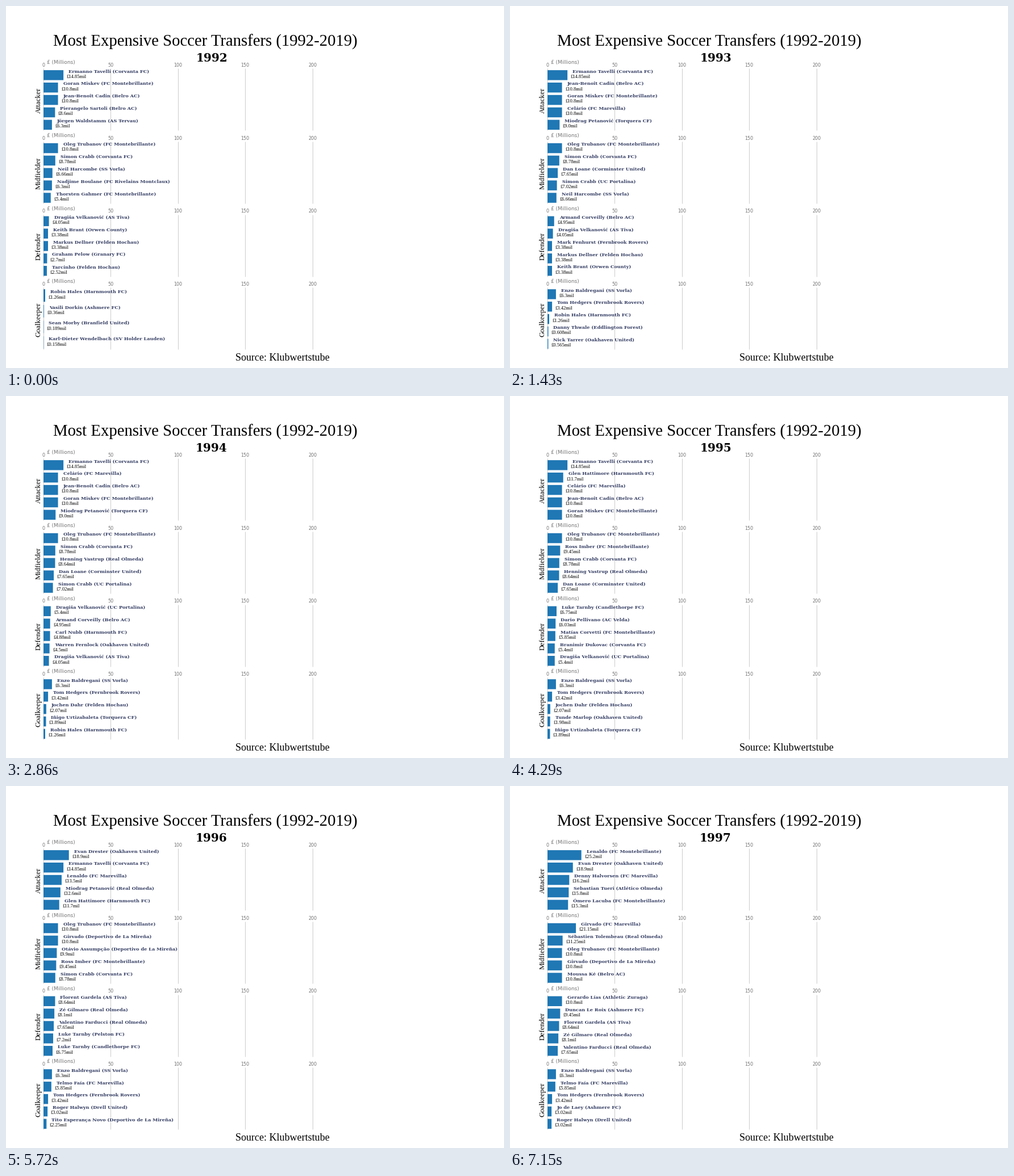
These frames come from a looping animation (877x638 px, 8 s). A matplotlib script:

```python
import matplotlib.pyplot as plt
from matplotlib.animation import FuncAnimation
from matplotlib.patches import Rectangle

W, H, DPI = 877, 638, 64
LOOP, STEP, HOLD = 8000, 40, 1430
START = 1992
X0, PER_MIL = 66, 2.3675
TOP, PITCH, TALL = 110.2, 128.7, 109
BAR, GREY, NAVY = "#1f77b4", "#777777", "#343d63"
SERIF, BOOK, SANS = "Liberation Serif", "DejaVu Serif", "DejaVu Sans"

# Each deal: player, club, fee in millions, year
DEALS = {
    "Attacker": [
        ("Ermanno Tavelli", "Corvanta FC", 14.85, 1992),
        ("Celário", "FC Marevilla", 10.8, 1993),
        ("Jean-Benoît Cadin", "Belro AC", 10.8, 1992),
        ("Goran Miskev", "FC Montebrillante", 10.8, 1992),
        ("Pierangelo Sartoli", "Belro AC", 8.6, 1992),
        ("Jörgen Waldstamm", "AS Tervau", 6.3, 1992),
        ("Miodrag Petanović", "Torquera CF", 9.0, 1993),
        ("Glen Hattimore", "Harnmouth FC", 11.7, 1995),
        ("Evan Drester", "Oakhaven United", 18.9, 1996),
        ("Lenaldo", "FC Marevilla", 13.5, 1996),
        ("Miodrag Petanović", "Real Olmeda", 12.6, 1996),
        ("Lenaldo", "FC Montebrillante", 25.2, 1997),
        ("Denny Halvorsen", "FC Marevilla", 16.2, 1997),
        ("Sebastian Tueri", "Atlético Olmeda", 15.8, 1997),
        ("Ómero Lacuba", "FC Montebrillante", 15.3, 1997),
    ],
    "Midfielder": [
        ("Oleg Trubanov", "FC Montebrillante", 10.8, 1992),
        ("Simon Crabb", "Corvanta FC", 8.78, 1992),
        ("Neil Harcombe", "SS Vorla", 6.66, 1992),
        ("Nadjime Boulane", "FC Rivelains Montclaux", 6.3, 1992),
        ("Thorsten Gahmer", "FC Montebrillante", 5.4, 1992),
        ("Dan Loane", "Corminster United", 7.65, 1993),
        ("Simon Crabb", "UC Portalina", 7.02, 1993),
        ("Henning Vastrup", "Real Olmeda", 8.64, 1994),
        ("Ross Imber", "FC Montebrillante", 9.45, 1995),
        ("Girvado", "Deportivo de La Mireña", 10.8, 1996),
        ("Otávio Assumpção", "Deportivo de La Mireña", 9.9, 1996),
        ("Girvado", "FC Marevilla", 21.15, 1997),
        ("Sébastien Tolembeau", "Real Olmeda", 11.25, 1997),
        ("Moussa Ké", "Belro AC", 10.8, 1997),
    ],
    "Defender": [
        ("Dragiša Velkanović", "AS Tiva", 4.05, 1992),
        ("Mark Fenhurst", "Fernbrook Rovers", 3.38, 1993),
        ("Markus Dellner", "Felden Hochau", 3.38, 1992),
        ("Keith Brant", "Orwen County", 3.38, 1992),
        ("Graham Pelow", "Granary FC", 2.7, 1992),
        ("Tarcinho", "Felden Hochau", 2.52, 1992),
        ("Armand Corveilly", "Belro AC", 4.95, 1993),
        ("Branimir Dukovac", "Corvanta FC", 5.4, 1995),
        ("Dragiša Velkanović", "UC Portalina", 5.4, 1994),
        ("Carl Nubb", "Harnmouth FC", 4.88, 1994),
        ("Warren Fernlock", "Oakhaven United", 4.5, 1994),
        ("Luke Tarnby", "Candlethorpe FC", 6.75, 1995),
        ("Dario Pellivano", "AC Velda", 6.03, 1995),
        ("Matías Corvetti", "FC Montebrillante", 5.85, 1995),
        ("Florent Gardela", "AS Tiva", 8.64, 1996),
        ("Zé Gilmaro", "Real Olmeda", 8.1, 1996),
        ("Valentino Farducci", "Real Olmeda", 7.65, 1996),
        ("Luke Tarnby", "Pelston FC", 7.2, 1996),
        ("Gerardo Lías", "Athletic Zuraga", 10.8, 1997),
        ("Duncan Le Roix", "Ashmere FC", 9.45, 1997),
    ],
    "Goalkeeper": [
        ("Robin Hales", "Harnmouth FC", 1.26, 1992),
        ("Vasili Dorkin", "Ashmere FC", 0.36, 1992),
        ("Sean Morby", "Branfield United", 0.189, 1992),
        ("Karl-Dieter Wendelbach", "SV Holder Lauden", 0.158, 1992),
        ("Enzo Baldregani", "SS Vorla", 6.3, 1993),
        ("Tom Hedgers", "Fernbrook Rovers", 3.42, 1993),
        ("Danny Thwale", "Eddlington Forest", 0.608, 1993),
        ("Nick Tarrer", "Oakhaven United", 0.565, 1993),
        ("Jochen Dahr", "Felden Hochau", 2.07, 1994),
        ("Iñigo Urtizabaleta", "Torquera CF", 1.89, 1994),
        ("Tunde Marlop", "Oakhaven United", 1.98, 1995),
        ("Telmo Faía", "FC Marevilla", 5.85, 1996),
        ("Jo de Laey", "Ashmere FC", 3.02, 1997),
        ("Roger Halwyn", "Drell United", 3.02, 1996),
        ("Tito Esperança Novo", "Deportivo de La Mireña", 2.25, 1996),
    ],
}

fig = plt.figure(figsize=(W / DPI, H / DPI), dpi=DPI, facecolor="white")
ax = fig.add_axes([0, 0, 1, 1])
ax.set_xlim(0, W)
ax.set_ylim(H, 0)
ax.axis("off")


def label(x, y, text, px, font, **style):
    return ax.text(x, y, text, fontsize=px * 72 / DPI, family=font,
                   va="baseline", **style)


def top_five(role, year):
    deals = [d for d in DEALS[role] if d[3] <= year]
    # equal fees are listed differently in the first two years
    if year == START:
        deals.reverse()
    elif year == START + 1 and role == "Attacker":
        deals.sort(key=lambda d: d[3])
    return sorted(deals, key=lambda d: -d[2])[:5]


def draw_panel(top, role):
    for mil in range(0, 201, 50):
        x = X0 + mil * PER_MIL
        ax.plot([x, x], [top, top + TALL], color="#cccccc",
                lw=72 / DPI, solid_capstyle="butt", zorder=1)
        label(x, top - 3.3, str(mil), 8, SANS, color=GREY, ha="center")
    label(72, top - 8, "£ (Millions)", 9, SANS, color=GREY)
    label(61, top + TALL / 2 + 1.5, role, 13.1, SERIF, ha="center",
          rotation=90, rotation_mode="anchor")


def make_row():
    bar = ax.add_patch(Rectangle((X0, 0), 0, 0, fc=BAR, lw=0, zorder=2,
                                 snap=False))
    name = label(0, 0, "", 8.2, BOOK, weight="bold", color=NAVY)
    fee = label(0, 0, "", 8.6, SERIF)
    return bar, name, fee


label(351, 71, "Most Expensive Soccer Transfers (1992-2019)", 28.8, SERIF,
      ha="center")
label(404, 625, "Source: Klubwertstube", 18, SERIF)
year_text = label(362, 98, "", 20, BOOK, weight="bold", ha="center")

panels = []
for k, role in enumerate(DEALS):
    draw_panel(TOP + k * PITCH, role)
    panels.append((TOP + k * PITCH, role, [make_row() for _ in range(5)]))


def fill_panel(top, role, rows, year):
    deals = top_five(role, year)
    pitch = 105 / (len(deals) - 0.2)
    for i, row in enumerate(rows):
        shown = i < len(deals)
        for part in row:
            part.set_visible(shown)
        if not shown:
            continue
        bar, name, fee = row
        player, club, mil, _ = deals[i]
        mid = top + 2.9 + (i + 0.4) * pitch
        end = X0 + mil * PER_MIL
        bar.set_bounds(X0, mid - 0.4 * pitch, end - X0, 0.8 * pitch)
        name.set_text(f"{player} ({club})")
        name.set_position((end + 9, mid - 4.4))
        fee.set_text(f"£{mil}mil")
        fee.set_position((end + 5.5, mid + 2 + 0.13 * pitch))


def update(frame):
    year = START + (frame * STEP + 30) // HOLD
    year_text.set_text(str(year))
    for top, role, rows in panels:
        fill_panel(top, role, rows, year)
    return []


anim = FuncAnimation(fig, update, frames=LOOP // STEP, interval=STEP,
                     repeat=True, repeat_delay=0, cache_frame_data=False)
plt.show()
```
